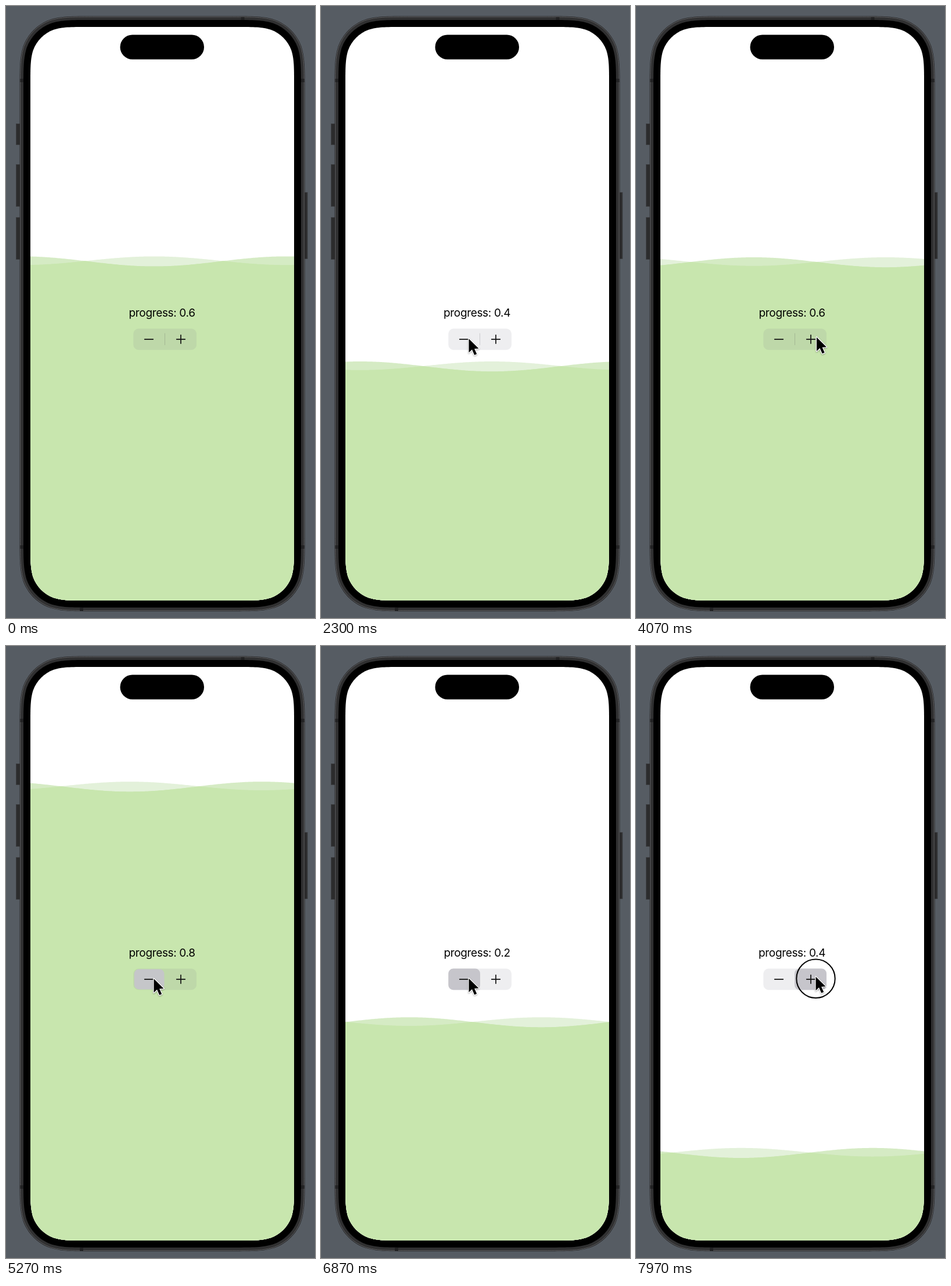
These frames come from a looping animation (532x1052 px, 8000 ms). An HTML page:

```html
<!DOCTYPE html>
<html lang="en">
<head>
<meta charset="utf-8">
<title>Wave progress</title>
<style>
  html, body { margin: 0; width: 100%; height: 100%; overflow: hidden; background: #565c63; }
  svg { display: block; width: 532px; height: 1052px; }
  text { font: 19px Inter, "Open Sans", sans-serif; letter-spacing: -.35px; text-anchor: middle; }
  .sign { stroke: #111; stroke-width: 1.7; stroke-linecap: round; fill: none; }
  .press { fill: #c6c5cb; transform-box: fill-box; transform-origin: center; }
</style>
</head>
<body>
<svg viewBox="0 0 532 1052">
  <defs><clipPath id="clip"><path id="mask"/></clipPath></defs>
  <g fill="#2c2c2d" stroke="#3b3c3f" stroke-width=".8">
    <rect x="17.5" y="202.5" width="8" height="36"/>
    <rect x="17.5" y="272.5" width="8" height="72"/>
    <rect x="17.5" y="363.5" width="8" height="72"/>
    <rect x="511" y="320.5" width="8" height="114"/>
  </g>
  <path id="edge" fill="#1d1d1e"/>
  <path id="rim" fill="#303031" stroke="#69696b" stroke-width=".9"/>
  <g fill="#222223">
    <rect x="404.500" y="19" width="6" height="6"/>
    <rect x="127" y="1034" width="6" height="6"/>
    <rect x="24.500" y="125" width="6" height="6"/>
    <rect x="507.500" y="125" width="6" height="6"/>
    <rect x="24.500" y="927" width="6" height="6"/>
    <rect x="507.500" y="927" width="6" height="6"/>
  </g>
  <path id="bezel"/>
  <g clip-path="url(#clip)">
    <rect x="40" y="34" width="458" height="990" fill="#fff"/>
    <path id="back" fill="#e3f1da"/>
    <path id="front" fill="#d5ebc4"/>
    <path id="both" fill="#c8e6ae"/>
  </g>
  <rect x="196.500" y="49.500" width="144.500" height="42.300" rx="21.150"/>
  <text id="label" x="268.600" y="533.500"></text>
  <rect x="219.300" y="554.500" width="108.700" height="36.700" rx="9" fill="#767680" fill-opacity=".12"/>
  <path id="divider" d="M273.500 562.500V583" stroke="#3c3c43" stroke-opacity=".2"/>
  <rect id="minus" class="press" x="219.300" y="554.500" width="54.700" height="36.700" rx="8.500"/>
  <rect id="plus" class="press" x="273" y="554.500" width="55" height="36.700" rx="8.500"/>
  <path class="sign" d="M238.700 572.800H253.300M293.700 572.800H308.300M301 565.500V580.100"/>
  <g id="pointer">
    <circle id="ring" cy="3.200" r="33.200" fill="none" stroke="#000" stroke-width="2"/>
    <path d="M0 0V23.800L5.500 18.600L9.700 28L13.700 26.200L9.600 17.200L17 16.800Z"
      stroke="#fff" stroke-width="2.600" paint-order="stroke" stroke-linejoin="round"
      style="filter:drop-shadow(0 1px 1px #0005)"/>
  </g>
</svg>
<script>
const $ = id => document.getElementById(id);
const LOOP = 8000, GLIDE = 800;
const LEFT = 42, RIGHT = 496, TOP = 36, BOTTOM = 1022;
const WIDTH = RIGHT - LEFT, HEIGHT = BOTTOM - TOP;

// Each burst: button, direction, how long a click is held, click times
const bursts = [
  { key: 'minus', dir: -1, hold: 50, at: [1602, 1705] },
  { key: 'plus', dir: 1, hold: 100, at: [3182, 3342] },
  { key: 'plus', dir: 1, hold: 90, at: [4250, 4412] },
  { key: 'minus', dir: -1, hold: 50, at: [5275, 5370, 5465, 5560] },
  { key: 'minus', dir: -1, hold: 50, at: [6700, 6800, 6890] },
  { key: 'plus', dir: 1, hold: 95, at: [7590, 7755, 7920] }
];
const clicks = bursts.flatMap(b => b.at.map(t => ({ t, dir: b.dir, hold: b.hold })));

const stops = [
  [1000, -20, 726], [1480, 254.5, 572], [2580, 254.5, 572], [3000, 313, 570],
  [4070, 311, 569.5], [4230, 310, 565], [4680, 310, 565], [4990, 254.5, 572],
  [7080, 254.5, 571.5], [7450, 309.5, 568.5]
];

const clamp = v => Math.min(1, Math.max(0, v));

// cubic-bezier(.42, 0, .58, 1)
function ease(x) {
  if (x <= 0) return 0;
  if (x >= 1) return 1;
  let lo = 0, hi = 1;
  for (let i = 0; i < 20; i++) {
    const s = (lo + hi) / 2, r = 1 - s;
    if (1.26 * r * r * s + 1.74 * r * s * s + s * s * s < x) lo = s; else hi = s;
  }
  return lo * lo * (3 - 2 * lo);
}

// Rounded rectangle with continuous corners, grown outwards from the screen
function squircle(grow) {
  const r = 63.5 + grow;
  const box = [LEFT - grow, TOP - grow, RIGHT + grow, BOTTOM + grow];
  const curve = [[1.529, 0], [1.088, 0], [.868, 0], [.631, .075], [.373, .169],
    [.169, .373], [.075, .631], [0, .868], [0, 1.088], [0, 1.529]];
  const corner = (right, low) => {
    const pts = curve.map(([u, v]) => [
      right ? box[2] - u * r : box[0] + u * r,
      low ? box[3] - v * r : box[1] + v * r
    ].map(n => n.toFixed(2)).join(' '));
    if (right === low) pts.reverse();
    return pts[0] + 'C' + pts.slice(1).join(' ');
  };
  return 'M' + [corner(0, 0), corner(1, 0), corner(1, 1), corner(0, 1)].join('L') + 'Z';
}

function area(fn) {
  let d = `M${LEFT} ${BOTTOM}`;
  for (let x = LEFT; x <= RIGHT; x += 2) d += `L${x} ${fn(x).toFixed(2)}`;
  return d + `L${RIGHT} ${BOTTOM}Z`;
}

function drawWaves(t) {
  let p = .6;
  for (const c of clicks) p += c.dir * .1 * ease((t - c.t) / GLIDE);
  const level = TOP + (1 - p) * HEIGHT;
  const crest = 482 - .1802 * t;
  const swing = x => Math.cos((x - crest) / WIDTH * 2 * Math.PI);
  const front = x => level + 8.6 * (1 - swing(x));
  const back = x => level + 7.4 * (1 + swing(x));
  $('front').setAttribute('d', area(front));
  $('back').setAttribute('d', area(back));
  $('both').setAttribute('d', area(x => Math.max(front(x), back(x))));
}

function drawStepper(t) {
  const value = clicks.reduce((n, c) => t >= c.t ? n + c.dir : n, 6);
  $('label').textContent = `progress: ${(value / 10).toFixed(1)}`;
  const glow = { minus: 0, plus: 0 }, size = { minus: 1, plus: 1 };
  for (const b of bursts) {
    const start = b.at[0] - 55, end = b.at[b.at.length - 1] + b.hold;
    if (t < start || t > end + 250) continue;
    const rise = clamp((t - start) / 80);
    glow[b.key] = Math.min(clamp(rise * 1.5), clamp(1 - (t - end) / 250));
    size[b.key] = .85 + .15 * rise;
  }
  for (const key in glow) {
    $(key).style.opacity = glow[key];
    $(key).style.transform = `scale(${size[key]})`;
  }
  $('divider').style.opacity = glow.minus + glow.plus > 0 ? 0 : 1;
}

function drawPointer(t) {
  const next = stops.findIndex(s => s[0] > t);
  const b = next < 0 ? stops[stops.length - 1] : stops[next];
  const a = next > 0 ? stops[next - 1] : b;
  const k = a === b ? 0 : ease((t - a[0]) / (b[0] - a[0]));
  const x = a[1] + (b[1] - a[1]) * k, y = a[2] + (b[2] - a[2]) * k;
  $('pointer').setAttribute('transform', `translate(${x} ${y})`);
  $('pointer').style.display = t < stops[0][0] ? 'none' : '';
  $('ring').style.display = clicks.some(c => t >= c.t && t < c.t + c.hold) ? '' : 'none';
}

function draw(now) {
  const t = now % LOOP;
  drawWaves(t);
  drawStepper(t);
  drawPointer(t);
}

for (const [id, grow] of [['edge', 18.5], ['rim', 17.3], ['bezel', 12], ['mask', 0]])
  $(id).setAttribute('d', squircle(grow));

let origin;
function tick(now) {
  origin ??= now;
  draw(Math.max(0, now - origin));
  requestAnimationFrame(tick);
}
draw(0);
requestAnimationFrame(tick);
</script>
</body>
</html>
```
